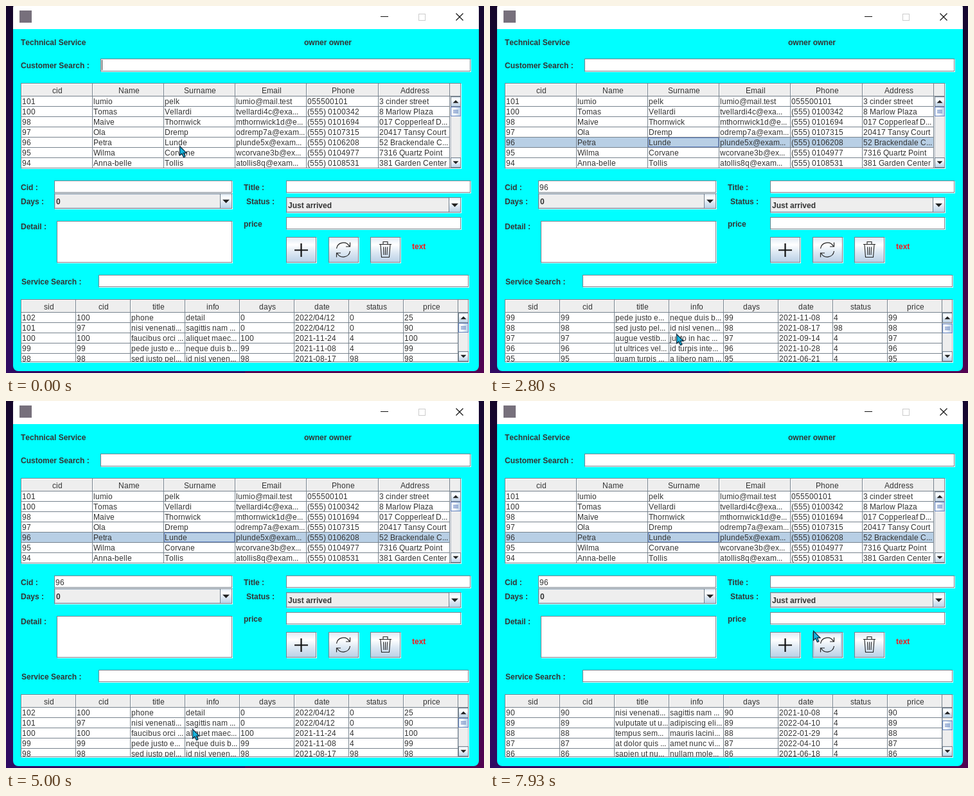
Animation, 744 px wide and 572 px high, one loop 8000 ms. Source, as an HTML page with a canvas:

```html
<!DOCTYPE html>
<html lang="en">
<head>
<meta charset="utf-8">
<title>Technical Service</title>
<style>
  html, body { margin: 0; width: 100%; height: 100%; overflow: hidden; background: #1f0638; }
  canvas { display: block; }
</style>
</head>
<body>
<canvas id="stage" width="744" height="572"></canvas>
<script>
const ctx = document.getElementById('stage').getContext('2d');
const LOOP = 8000, CLICK = 430;
const EDGE = '#76828d', INK = '#333', PANEL = '#eee', SELECT = '#b8cfe5', FOCUS = '#6382bf';
const REGULAR = '12px "Liberation Sans", Arial, sans-serif';
const BOLD = 'bold ' + REGULAR;

const customers = {
  x: 23, y: 120, w: 685, h: 133, bar: 692, total: 100,
  edges: [24, 135, 246, 357, 468, 580, 691],
  head: ['cid', 'Name', 'Surname', 'Email', 'Phone', 'Address'],
  rows: [
    '101|lumio|pelk|lumio@mail.test|055500101|3 cinder street',
    '100|Tomas|Vellardi|tvellardi4c@exa...|(555) 0100342|8 Marlow Plaza',
    '98|Maive|Thornwick|mthornwick1d@e...|(555) 0101694|017 Copperleaf D...',
    '97|Ola|Dremp|odremp7a@exam...|(555) 0107315|20417 Tansy Court',
    '96|Petra|Lunde|plunde5x@exam...|(555) 0106208|52 Brackendale C...',
    '95|Wilma|Corvane|wcorvane3b@ex...|(555) 0104977|7316 Quartz Point',
    '94|Anna-belle|Tollis|atollis8q@exam...|(555) 0108531|381 Garden Center'
  ].map(row => row.split('|'))
};

const services = {
  x: 23, y: 457, w: 697, h: 98, bar: 704, total: 102,
  edges: Array.from({ length: 9 }, (_, i) => 24 + 85 * i),
  head: ['sid', 'cid', 'title', 'info', 'days', 'date', 'status', 'price'],
  rows: [
    '102|100|phone|detail|0|2022/04/12|0|25',
    '101|97|nisi venenati...|sagittis nam ...|0|2022/04/12|0|90',
    ...[
      'faucibus orci ...|aliquet maec...|2021-11-24',
      'pede justo e...|neque duis b...|2021-11-08',
      'sed justo pel...|id nisl venen...|2021-08-17',
      'augue vestib...|justo in hac ...|2021-09-14',
      'ut ultrices vel...|id turpis inte...|2021-10-28',
      'quam turpis ...|a libero nam ...|2021-06-21',
      'molestie hen...|vel est donec...|2021-05-18',
      'pharetra ma...|enim in temp...|2021-10-10',
      'nulla dapibu...|aliquam aug...|2021-12-26',
      'lectus in est ...|morbi non lec...|2021-07-30',
      'nisi venenati...|sagittis nam ...|2021-10-08',
      'vulputate ut u...|adipiscing eli...|2022-04-10',
      'tempus sem...|mauris lacini...|2022-01-29',
      'at dolor quis ...|amet nunc vi...|2022-04-10',
      'sapien ut nu...|nullam mole...|2021-06-18'
    ].map((row, i) => {
      const id = 100 - i, [title, info, date] = row.split('|');
      return [id, id, title, info, id, date, id === 98 ? 98 : 4, id].join('|');
    })
  ].map(row => row.split('|'))
};

// Text inputs: x, y, width, height
const fields = [
  [147, 82, 576, 20], [75, 272, 277, 19], [436, 272, 287, 19],
  [436, 329, 272, 19], [79, 335, 273, 65], [144, 419, 576, 19]
];

// Pointer stops: time, x, y
const pointerPath = [
  [0, 270, 218], [550, 270, 218], [1200, 230, 474], [1480, 230, 474], [1950, 313, 492],
  [2150, 313, 492], [2500, 290, 511], [5900, 290, 511], [6480, 558, 94],
  [6980, 558, 94], [7760, 503, 358], [LOOP, 503, 358]
];

// Wheel notches: time, first visible row
const wheel = [
  [2750, 3], [3050, 6], [4400, 3], [4650, 0], [5150, 3], [5300, 6], [5450, 9], [5600, 12]
];

function rect(x, y, w, h, color) {
  ctx.fillStyle = color;
  ctx.fillRect(x, y, w, h);
}

function outline(x, y, w, h, color = EDGE) {
  ctx.strokeStyle = color;
  ctx.lineWidth = 1;
  ctx.strokeRect(x + .5, y + .5, w - 1, h - 1);
}

function etched(x, y, w, h, fill) {
  rect(x + 1, y + 1, w, h, '#fff');
  rect(x, y, w, h, fill);
  outline(x, y, w, h);
}

function path(d, color, width = 1) {
  ctx.strokeStyle = color;
  ctx.lineWidth = width;
  ctx.stroke(new Path2D(d));
}

function gradient(x, y, dx, dy, stops) {
  const g = ctx.createLinearGradient(x, y, x + dx, y + dy);
  stops.forEach(stop => g.addColorStop(...stop));
  return g;
}

function label(text, x, y, color = INK) {
  ctx.font = BOLD;
  ctx.fillStyle = color;
  ctx.fillText(text, x, y);
}

// Regular text sits on whole-pixel advances, as in a hinted desktop toolkit.
const advance = {};
const charWidth = c => advance[c] ??= Math.round(ctx.measureText(c).width);
const textWidth = text => [...text].reduce((sum, c) => sum + charWidth(c), 0);

function plain(text, x, y) {
  ctx.fillStyle = INK;
  for (const c of text) {
    ctx.fillText(c, x, y);
    x += charWidth(c);
  }
}

function glossy(x, y, w, h, sideways) {
  rect(x, y, w, h, gradient(x, y, sideways ? w : 0, sideways ? 0 : h,
    [[0, '#dde8f3'], [.3, '#fff'], [.6, '#dde8f3'], [1, SELECT]]));
  outline(x, y, w, h);
}

function triangle(x, y, size, dir) {
  ctx.fillStyle = '#222';
  ctx.fill(new Path2D(`M${x - size} ${y - dir * size / 2}h${size * 2}l${-size} ${dir * size}z`));
}

function scrollBar(x, top, bottom, progress) {
  const h = bottom - top;
  rect(x, top, 16, h, PANEL);
  outline(x, top, 16, h, '#b5bec8');
  glossy(x, top, 16, 16);
  glossy(x, bottom - 16, 16, 16);
  triangle(x + 8, top + 8, 4.5, -1);
  triangle(x + 8, bottom - 8, 4.5, 1);
  const y = top + 16 + Math.round(progress * (h - 47));
  glossy(x, y, 16, 15, true);
  outline(x, y, 16, 15, FOCUS);
  for (const dy of [5, 7, 9]) rect(x + 4, y + dy, 8, 1, FOCUS);
}

function table(t, first, selected) {
  const top = t.y + 21, bottom = t.y + t.h - 1, right = t.edges.at(-1);
  etched(t.x, t.y, t.w, t.h, PANEL);
  rect(t.x + 1, top, right - t.x - 1, bottom - top, '#fff');
  rect(t.x + 1, top - 1, t.w - 2, 1, EDGE);
  ctx.font = REGULAR;
  ctx.save();
  ctx.beginPath();
  ctx.rect(t.x + 1, t.y, t.w - 2, t.h - 1);
  ctx.clip();
  t.head.forEach((name, c) => {
    const left = t.edges[c], end = t.edges[c + 1];
    rect(left, t.y + 1, end - left - 1, 1, '#fff');
    rect(left, t.y + 1, 1, 19, '#fff');
    plain(name, Math.round((left + end + 1 - textWidth(name)) / 2), t.y + 16);
  });
  t.rows.slice(first, first + 7).forEach((row, r) => {
    const y = top + 16 * r;
    if (y >= bottom) return;
    if (row[0] === selected) rect(t.x + 1, y, right - t.x - 1, 15, SELECT);
    rect(t.x + 1, y + 15, right - t.x - 1, 1, EDGE);
    row.forEach((cell, c) => plain(cell, t.edges[c] + 1, y + 12));
    if (row[0] === selected) outline(t.edges[2], y, 110, 15, FOCUS);
  });
  t.edges.slice(1).forEach(x => rect(x - 1, t.y + 1, 1, t.h - 2, EDGE));
  ctx.restore();
  scrollBar(t.bar, top, bottom, first * 16 / (t.total * 16 - (bottom - top)));
}

function combo(x, y, w, text) {
  etched(x, y, w, 24, PANEL);
  outline(x + 1, y + 1, w - 2, 22, '#c4d2e0');
  glossy(x + w - 19, y, 19, 24);
  triangle(x + w - 9.5, y + 12.5, 5.5, 1);
  label(text, x + 3, y + 17);
}

function iconButton(x, hovered) {
  etched(x, 360, 47, 40, PANEL);
  glossy(x, 360, 47, 40);
  if (hovered) {
    outline(x + 1, 361, 45, 38, SELECT);
    outline(x + 2, 362, 43, 36, SELECT);
  }
}

function windowFrame() {
  rect(0, 0, 744, 572, gradient(0, 0, 0, 572, [[0, '#14052a'], [.5, '#260850'], [1, '#300a62']]));
  rect(372, 0, 372, 572, gradient(0, 0, 0, 572, [[0, '#14072f'], [.5, '#300645'], [1, '#520352']]));
  ctx.save();
  ctx.beginPath();
  ctx.roundRect(11, -5, 725, 574, 8);
  ctx.clip();
  rect(11, 0, 725, 36, '#fff');
  rect(11, 36, 725, 533, '#0ff');
  ctx.restore();
  rect(21, 7, 19, 19, '#77707c');
  path('M583 16.5h12', '#111');
  outline(642, 12, 11, 11, '#ccc');
  path('M700.5 11.5l11 11m0-11l-11 11', '#111', 1.2);
}

function form(t, pointer) {
  label('Technical Service', 23, 61);
  label('owner owner', 464, 61);
  label('Customer Search :', 23, 97);
  label('Cid :', 23, 287);
  label('Days :', 23, 309);
  label('Detail :', 23, 348);
  label('Title :', 370, 287);
  label('Status :', 374, 309);
  label('price', 370, 344);
  label('Service Search :', 24, 434);
  label('text', 632, 379, '#f8181c');
  fields.forEach(f => etched(...f, '#fff'));
  combo(75, 292, 277, '0');
  combo(436, 298, 272, 'Just arrived');

  ctx.font = REGULAR;
  if (t < CLICK) rect(149, 84, 1, 16, INK);
  else plain('96', 77, 287);

  const [px, py] = pointer;
  for (const x of [436, 502, 567]) {
    iconButton(x, px >= x && px < x + 47 && py >= 357 && py < 400);
  }
  path('M449 380.5h21M459.5 370v21', '#111', 2.2);
  path('M514.5 378a10.7 10.7 0 0 1 20-3.5M535.5 382a10.7 10.7 0 0 1-20 3.5' +
       'M535.5 368.5v6.5h-6.5M514.5 391.5v-6.5h6.5', '#222', 1.2);
  path('M581 371.5h19M587 371v-3.5h7v3.5M583 372l1.5 19.5h12l1.5-19.5' +
       'M587.5 375.5l.5 12.5M590.5 375.5v12.5M593.5 375.5l-.5 12.5', '#222', 1.1);
}

function pointerAt(t) {
  const i = pointerPath.findIndex((stop, n) => n && t <= stop[0]);
  const [t0, x0, y0] = pointerPath[i - 1], [t1, x1, y1] = pointerPath[i];
  const u = (t - t0) / (t1 - t0), k = u * u * (3 - 2 * u);
  return [Math.round(x0 + (x1 - x0) * k), Math.round(y0 + (y1 - y0) * k)];
}

function drawPointer([x, y]) {
  ctx.save();
  ctx.translate(x, y);
  if (fields.some(([fx, fy, w, h]) => x >= fx && x < fx + w && y >= fy && y < fy + h)) {
    path('M-4 -7.5h9M-4 8.5h9M.5 -7.5v16', '#10243c', 2);
  } else {
    const arrow = 'M.5 .5v14.5l3.3-3 2.6 5.8 2.6-1.2-2.6-5.4h4.6z';
    ctx.fillStyle = '#18b4dc';
    ctx.fill(new Path2D(arrow));
    path(arrow, '#0c2438', 1.2);
  }
  ctx.restore();
}

function draw(now) {
  const t = now % LOOP;
  const pointer = pointerAt(t);
  const first = wheel.reduce((row, [at, to]) => t >= at ? to : row, 0);
  windowFrame();
  form(t, pointer);
  table(customers, 0, t >= CLICK ? '96' : null);
  table(services, first, null);
  drawPointer(pointer);
}

ctx.fontKerning = 'none';
const start = performance.now();
(function tick() {
  draw(performance.now() - start);
  requestAnimationFrame(tick);
})();
</script>
</body>
</html>
```
